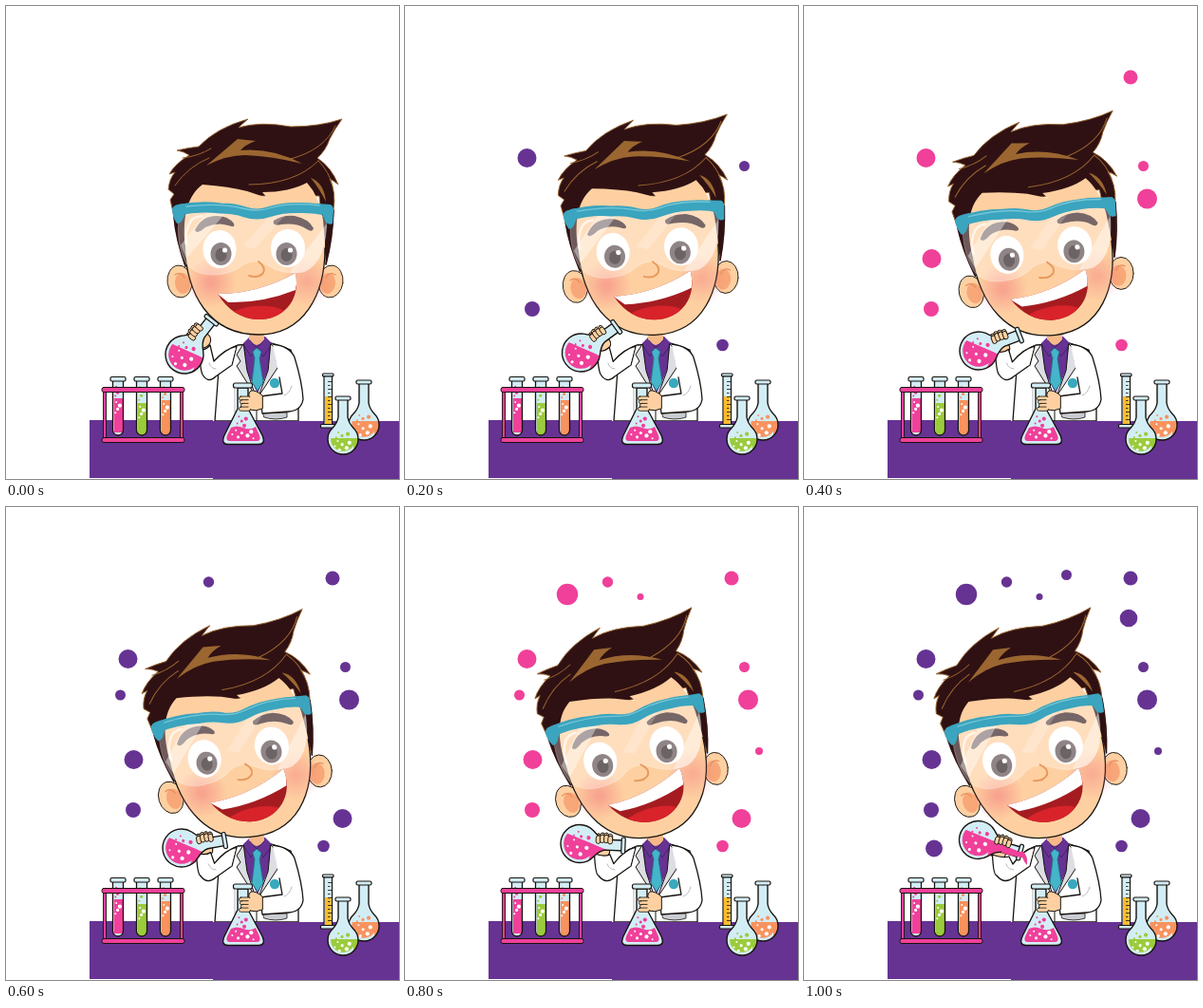
An HTML page with a canvas that plays this animation: 414x498 px, repeating every 1200 ms.

```html
<!DOCTYPE html>
<html lang="en">
<head>
<meta charset="utf-8">
<title>Young chemist</title>
<style>
html, body { margin: 0; width: 100%; height: 100%; overflow: hidden; background: #fff; }
canvas { display: block; }
</style>
</head>
<body>
<canvas id="stage" width="414" height="498"></canvas>
<script>
const ctx = document.getElementById('stage').getContext('2d');
const INK = '#17130f', PURPLE = '#663393', PINK = '#f0409a', GLASS = '#d3edf5',
  SKIN = '#fed0a1', TEAL = '#3ba4be', HAIR = '#2f1113', GOLD = '#9b6630',
  GREEN = '#9bcb3c', ORANGE = '#f8935f';
const STEP = 200, COUNT = 6;

// Poses per step
const headTurn = [0, 3.6, 7, 10.1, 12.5, 12.5];
const flaskTurn = [-52, -36, -21, -10, 2.5, 16.5];
const flaskX = [188, 185.5, 184, 185, 184, 183.5];
const flaskY = [367, 365, 363, 359, 354.5, 350.5];

// [first step, x, y, radius]
const dots = [
  [1, 128.5, 160, 10], [1, 357.5, 168.5, 5.5], [1, 134, 319, 8], [1, 334.5, 357, 6.3],
  [2, 344, 75, 7.5], [2, 361.5, 203, 10.5], [2, 134.5, 266, 10],
  [3, 213.5, 79, 5.7], [3, 120.5, 198, 5.5], [3, 354.5, 328, 10],
  [4, 171, 92, 11.2], [4, 248, 94.5, 3.5], [4, 373, 257, 4],
  [5, 276.5, 71.5, 5.5], [5, 342, 117, 9.3], [5, 137, 359.5, 9]
];

const rad = deg => deg * Math.PI / 180;

function paint(path, fill, stroke, width = 1.3) {
  const p = typeof path === 'string' ? new Path2D(path) : path;
  if (fill) { ctx.fillStyle = fill; ctx.fill(p); }
  if (stroke) { ctx.strokeStyle = stroke; ctx.lineWidth = width; ctx.stroke(p); }
}

function oval(x, y, rx, ry, fill, stroke, width, turn = 0) {
  const p = new Path2D();
  p.ellipse(x, y, rx, ry, turn, 0, 7);
  paint(p, fill, stroke, width);
}

function bar(x, y, w, h, r, fill, stroke = INK, width = 1.2) {
  const p = new Path2D();
  p.roundRect(x, y, w, h, r);
  paint(p, fill, stroke, width);
}

function within(path, draw) {
  ctx.save();
  ctx.clip(path);
  draw();
  ctx.restore();
}

function bubbles(x, y, w, h, n, color) {
  for (let i = 0; i < n; i++) {
    const u = (i * 0.618 + 0.2) % 1, v = (i + 0.5) / n, r = 1 + (i * 5 % 3) * 0.55;
    oval(x + u * w, y + v * h, r, r, color);
  }
}

// Round flask with the neck along local +x
function roundFlask(x, y, angle, r, half, len, color, level, tilt) {
  const open = 0.75, p = new Path2D();
  p.arc(0, 0, r, open, Math.PI * 2 - open);
  p.quadraticCurveTo(r + 1, -half - 1, r + 7, -half);
  p.lineTo(len, -half);
  p.lineTo(len, half);
  p.lineTo(r + 7, half);
  p.quadraticCurveTo(r + 1, half + 1, r * Math.cos(open), r * Math.sin(open));
  p.closePath();
  ctx.save();
  ctx.translate(x, y);
  ctx.rotate(angle);
  paint(p, GLASS);
  within(p, () => {
    ctx.rotate(tilt - angle);
    ctx.beginPath();
    ctx.arc(0, 0, r - 3.2, 0, 7);
    ctx.rect(r - 5, level, 40, 40);
    ctx.clip();
    ctx.fillStyle = color;
    ctx.fillRect(-60, level, 130, 60);
    bubbles(-r * 0.6, level + 2, r * 1.25, r * 0.75 - level, 7, '#fff');
    bubbles(-r * 0.5, level - 7, r, 7, 4, color);
  });
  paint(p, null, INK, 1.4);
  bar(len - 2, -half - 3, 4, half * 2 + 6, 1.5, GLASS);
  ctx.restore();
}

function tube(x, top, color) {
  const p = new Path2D();
  p.roundRect(x - 5.5, 393, 11, 59, [0, 0, 5.5, 5.5]);
  paint(p, GLASS);
  within(p, () => {
    ctx.fillStyle = color;
    ctx.fillRect(x - 4.2, top, 11, 36);
    bubbles(x - 3, top + 2, 6, 15, 4, '#fff');
    bubbles(x - 3, 399, 6, top - 400, 4, color);
  });
  paint(p, null, INK);
  bar(x - 8, 390.5, 16, 4.5, 1.5, GLASS);
}

function rack() {
  bar(102.5, 405, 3, 53, 1, PINK, INK, 0.9);
  bar(183.5, 405, 3, 53, 1, PINK, INK, 0.9);
  bar(101, 454.5, 87, 5, 2, PINK, INK, 1);
  tube(118, 413, PINK);
  tube(143, 418, GREEN);
  tube(168, 415, ORANGE);
  bar(101, 401.5, 87, 5, 2, PINK, INK, 1);
}

function cylinder() {
  bar(335, 389, 8.5, 53, 0, GLASS);
  ctx.fillStyle = '#fdbb2c';
  ctx.fillRect(336, 411, 6.5, 29);
  for (let y = 395; y < 438; y += 4) {
    ctx.fillStyle = INK;
    ctx.fillRect(339, y, y % 8 === 3 ? 4 : 2.5, 0.8);
  }
  bar(333.5, 387, 11.5, 2.8, 1, GLASS);
  bar(331.5, 440.5, 16, 3.5, 1, GLASS);
}

function coat() {
  paint('M244 357Q230 362 224 383L220 437H308V400L300 362L280 355Z', '#fff', INK);
  paint('M250 355L257 348H273L280 355L277 382L265 408L252 382Z', PURPLE);
  paint('M256 340V351Q259 356 264 357Q269 356 272 351V340Z', '#f6b98a');
  paint('M257 352L264 360L258 369L251 358M272 352L264 360L271 369L279 358', null, '#43205f', 0.9);
  paint('M260 364L264 360L269 364L267 371L271 396L265 405L259 396L262 371Z', '#45b5ca', '#1f7285', 0.8);
  paint('M250 356L243 367L247 374L243 379L263 411L254 384Z', '#dcdee3', INK, 1);
  paint('M279 356L290 366L285 373L288 378L266 411L276 384Z', '#dcdee3', INK, 1);
  paint('M264 411V437', null, INK, 1);
  paint('M271 428H296V433Q284 437 272 433Z', '#c9ccd2', INK, 0.8);
  paint('M241 402V428', null, '#a9acb3', 0.9);
}

function middleFlask() {
  const p = new Path2D('M244 402V424L230 452Q226 461.500 234 461.500H266Q274 461.500 270 452L255 424V402Z');
  paint(p, GLASS);
  paint('M237 444Q243 441 250 444T263 443L267 452Q269 458 264 458H236Q231 458 233 452Z', PINK);
  bubbles(237, 446, 26, 10, 7, '#fff');
  bubbles(243, 431, 12, 12, 5, PINK);
  paint(p, null, INK, 1.4);
  bar(239.5, 397, 20, 5, 2, GLASS);
}

function rightArm() {
  paint('M281 356Q299 358 304 370Q312 396 313 414Q311 426 298 427L270 429L268 411L291 408L288 391', '#fff', INK);
  paint('M293 410Q299 408 301 400', null, '#b6b9c0', 1);
  paint('M270 410Q263 404 258 405Q254 409 257 413L256 425Q264 427 270 424Z', SKIN, INK, 1);
  for (let i = 0; i < 4; i++) bar(245.5 + i % 3, 411 + i * 3.7, 12, 4.2, 2.1, SKIN, INK, 0.8);
  ctx.fillStyle = SKIN;
  ctx.fillRect(255.5, 412, 6, 12);
  oval(283, 397, 5.2, 5.2, '#3aa9bd');
}

function pouringArm(step) {
  const k = step / 5, x = flaskX[step], y = flaskY[step], a = rad(flaskTurn[step]);
  const alongFlask = draw => {
    ctx.save();
    ctx.translate(x, y);
    ctx.rotate(a);
    draw();
    ctx.restore();
  };
  alongFlask(() => {
    oval(24, 7, 8, 7, SKIN, INK, 1.1);
    for (let i = 0; i < 4; i++)
      bar(17 + i * 4.2, -13 + Math.abs(i - 1.5), 4.8, 13, 2.4, SKIN, INK, 0.9);
  });
  const cx = 203.5 - 5 * k, cy = 361 + 5 * k;
  paint(`M${cx} ${cy}Q${cx + 1} ${cy + 22} ${207 - 4 * k} 388Q${213 - 2 * k} 398 221 390L238 378L243 358Q231 361 ${219 + k} ${374 + 2 * k}L${215 + k} ${357 + 11 * k}Q${209 + k} ${364 + 6 * k} ${cx} ${cy}Z`, '#fff', INK);
  paint(`M${214 - k} 376Q${216 - k} 382 221 382`, null, '#b6b9c0', 1);
  // Covers the seam between sleeve and shoulder
  paint('M237 379L242 360L230 366Z', '#fff');
  roundFlask(x, y, a, 20, 5.5, 46, PINK, -5, rad(24 - 2 * k));
  // Fingertips curl over the glass
  alongFlask(() => {
    for (let i = 0; i < 4; i++)
      bar(17 + i * 4.2, -11 + Math.abs(i - 1.5), 4.8, 8.5, 2.4, SKIN, INK, 0.9);
  });
  if (step === 5) paint('M208 357Q219 363 231 363Q236 367 235 377Q232 374 230 369Q220 368 208 364Z', PINK);
}

function blush(x, y, alpha) {
  const g = ctx.createRadialGradient(x, y, 3, x, y, 27);
  g.addColorStop(0, `rgba(242,120,125,${alpha})`);
  g.addColorStop(1, 'rgba(242,120,125,0)');
  oval(x, y, 27, 27, g);
}

function eye(x, y, rx, px) {
  oval(x, y, rx, 20, '#fff');
  oval(px, 261, 11, 12, '#5f5052');
  oval(px, 262, 6, 7, '#2b1f21');
  oval(px + 4, 257, 2.6, 2.6, '#fff');
}

function goggles() {
  const lens = new Path2D('M182 222Q179 250 189 270Q198 283 217 283Q238 283 249 273Q262 265 275 273Q293 284 314 280Q338 270 338 222Q300 212 262 224Q215 211 182 222Z');
  paint(lens, 'rgba(255,255,255,.3)', 'rgba(255,255,255,.25)', 1);
  within(lens, () => {
    const glare = 'rgba(255,255,255,.4)';
    paint('M184 252L211 217H232L190 266Z', glare);
    paint('M340 226V262L312 284H296Z', glare);
    paint('M282 216H298L262 256L250 252Z', 'rgba(255,255,255,.2)');
  });
  paint('M190 251Q188 236 195 226Q198 222 206 221', null, 'rgba(255,255,255,.7)', 2.5);
  paint('M178 210Q186 207 194 208L186 225Q184 229 180 229Q175 222 175 213Z', TEAL);
  paint('M328 208L342 209Q345 211 345 215L344 229Q341 231 337 228Z', TEAL);
  paint('M181 215Q203 210 226 213Q241 213 252 217Q264 221 276 217Q291 212 308 212.500Q326 212 339 216', null, TEAL, 11);
  paint('M190 211Q225 207 249 213Q264 217 277 213Q299 206 330 210', null, '#75c7d8', 1.3);
}

function mouth() {
  const p = new Path2D('M223 303Q266 303 305 281Q309 303 297 317Q284 331 264 330Q238 328 223 303Z');
  paint(p, '#a51c20');
  within(p, () => {
    oval(263, 332, 36, 16, '#d8232b', null, 1, -0.1);
    paint('M219 300L309 276L305 299Q270 313 234 312Z', '#fff');
  });
}

function head(turn) {
  ctx.save();
  ctx.translate(268, 350);
  ctx.rotate(rad(-turn));
  ctx.translate(-268, -350);

  paint('M189 274Q179 245 177 222L173 204L177 198L171 193Q172 182 178 175L172 177Q178 166 193 157Q187 153 180 152Q193 149 203 148Q222 128 255 119Q248 125 245 128Q268 121 300 127Q330 127 354 119Q346 130 341 140Q337 152 328 160Q343 170 350 188Q345 184 341 182Q348 196 345 215Q344 245 337 272L330 200H200Z', HAIR, GOLD, 0.9);
  paint('M189 274Q179 245 177 222M337 272Q344 245 345 215', null, HAIR, 1.6);
  paint('M211 168Q230 152 244 140Q252 141 263 142Q252 146 247 152Q280 149 312 166Q280 158 252 157Q232 157 211 168Z', GOLD);
  paint('M321 181Q335 186 337 206Q330 192 321 181Z', GOLD);
  paint('M178 189Q192 169 214 160M256 188Q304 188 329 163M300 161Q336 151 347 126M329 163Q341 175 344 190M186 160Q203 158 216 150', null, GOLD, 1);

  for (const [x, side] of [[183, 1], [342, -1]]) {
    oval(x, 290, 13, 17, SKIN, INK, 0.9, -0.12 * side);
    oval(x + 3 * side, 292, 8, 11, '#f8a878', null, 1, -0.12 * side);
    paint(`M${x - 5 * side} 283q${6 * side} -4 ${10 * side} 3`, null, '#e58d5c', 1.2);
  }
  paint('M188 245C187 220 191 200 207 188Q235 190 254 195L275 202L270 196Q299 196 317 186Q330 200 334 225L336 250C337 302 315 346 266 346C213 346 189 302 188 245Z', SKIN);
  paint('M188 250C190 304 214 346 266 346C314 346 336 304 336 255', null, INK, 1.3);
  blush(216, 291, 0.5);
  blush(317, 290, 0.38);

  eye(225, 256, 17.5, 226.5);
  eye(297, 255, 18, 295.5);
  paint('M199 236Q206 221 222 221Q234 221 240 229Q242 234 234 231Q222 227 210 233Q201 241 199 236Z', '#3a2425');
  paint('M282 226Q291 220 304 221Q319 224 324 234Q323 239 317 235Q306 228 290 230Q280 232 282 226Z', '#3a2425');
  goggles();
  paint('M266 269Q274 275 271 281Q266 287 256 284', null, '#e89a5e', 2);
  mouth();
  ctx.restore();
}

function draw(now) {
  const step = Math.floor(now / STEP) % COUNT;
  ctx.fillStyle = '#fff';
  ctx.fillRect(0, 0, 414, 498);
  ctx.lineJoin = ctx.lineCap = 'round';

  for (const [first, x, y, r] of dots)
    if (step >= first) oval(x, y, r, r, step % 2 ? PURPLE : PINK);

  coat();
  ctx.fillStyle = PURPLE;
  ctx.fillRect(88, 436, 130, 61);
  ctx.fillRect(218, 437, 196, 61);
  rack();
  head(headTurn[step]);
  pouringArm(step);
  middleFlask();
  rightArm();
  cylinder();
  roundFlask(377, 441, -Math.PI / 2, 16, 5, 45, ORANGE, -4, 0);
  roundFlask(355, 456, -Math.PI / 2, 16, 5, 43, GREEN, -1, 0);
}

const start = performance.now();
function tick() {
  draw(performance.now() - start);
  requestAnimationFrame(tick);
}
tick();
</script>
</body>
</html>
```
